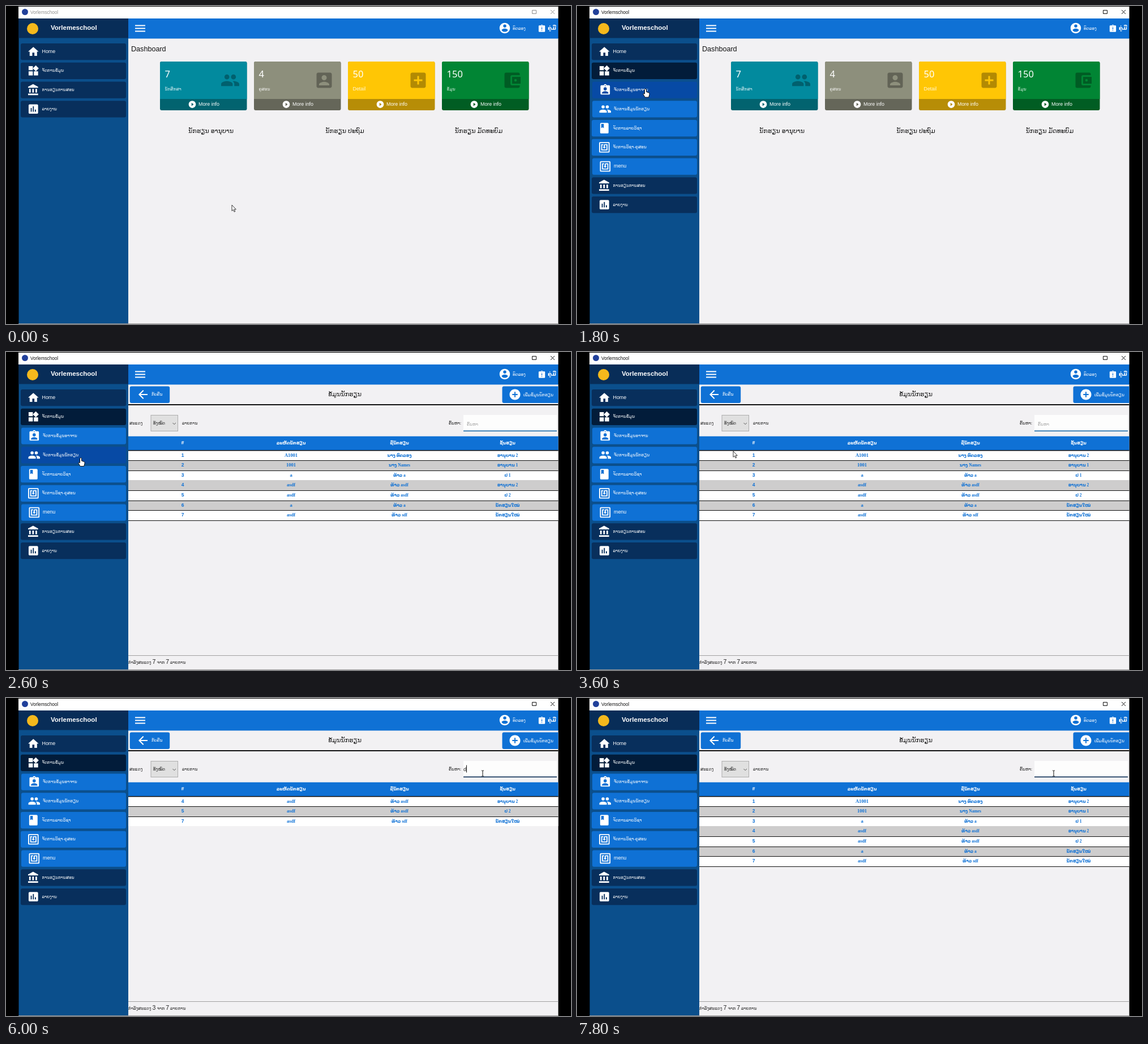
Animation of 998 by 561 pixels, one loop 8000 ms. Source, as an HTML page:

```html
<!DOCTYPE html>
<html lang="lo">
<head>
<meta charset="utf-8">
<title>School dashboard</title>
<style>
  html, body { margin: 0; width: 100%; height: 100%; overflow: hidden; background: #000; }
  svg { display: block; width: 998px; height: 561px; }
  text { font-family: "Liberation Sans", "Noto Sans", "DejaVu Sans", sans-serif; white-space: pre; }
  .wide { font-family: "Noto Sans", "DejaVu Sans", sans-serif; }
  .cell { font-family: "Liberation Serif", "Noto Sans", "DejaVu Sans", serif; }
</style>
</head>
<body>
<svg id="stage" viewBox="0 0 998 561"></svg>
<script>
const LOOP = 8000, TICK = 200;
const MENU_OPEN = 1400, PAGE_OPEN = 2600, FOCUS = 5400, TYPED = 5800, CLEARED = 6800;
const BLUE = '#0f71d5', NIGHT = '#082f5c', DEEP = '#021c3a', PAPER = '#f2f1f3';
const SMALL = 7.4, LATIN = 8.9;

const disc = 'M12 2C6.48 2 2 6.48 2 12s4.48 10 10 10 10-4.48 10-10S17.52 2 12 2z';
const box = 'M19 3H5c-1.1 0-2 .9-2 2v14c0 1.1.9 2 2 2h14c1.1 0 2-.9 2-2V5c0-1.1-.9-2-2-2z';
const clip = 'M19 3h-4.2a3 3 0 0 0-5.6 0H5a2 2 0 0 0-2 2v14a2 2 0 0 0 2 2h14a2 2 0 0 0 2-2V5a2 2 0 0 0-2-2zM12 3a1 1 0 1 1 0 2 1 1 0 0 1 0-2z';
const person = 'M12 7a3 3 0 1 1 0 6 3 3 0 0 1 0-6zM18 19H6v-1.4c0-2 4-3.1 6-3.1s6 1.1 6 3.1z';
const icons = {
  home: 'M10 20v-6h4v6h5v-8h3L12 3 2 12h3v8z',
  widgets: 'M13 13v8h8v-8zM3 21h8v-8H3zM3 3v8h8V3zM16.66 1.7 11 7.34 16.66 13l5.66-5.66z',
  bank: 'M4 10v7h3v-7zM10 10v7h3v-7zM2 22h19v-3H2zM16 10v7h3v-7zM11.5 1 2 6v2h19V6z',
  chart: box + 'M9 17H7v-7h2zM13 17h-2V7h2zM17 17h-2v-4h2z',
  badge: clip + person,
  late: clip + 'M11 8h2v6h-2zM11 16h2v2h-2z',
  group: 'M16 11a3 3 0 1 0 0-6 3 3 0 0 0 0 6zM8 11a3 3 0 1 0 0-6 3 3 0 0 0 0 6zM8 13c-2.33 0-7 1.17-7 3.5V19h14v-2.5C15 14.2 10.3 13 8 13zM16 13l-1 .05c1.2.84 2 1.97 2 3.45V19h6v-2.5c0-2.33-4.67-3.5-7-3.5z',
  book: 'M18 2H6a2 2 0 0 0-2 2v16a2 2 0 0 0 2 2h12a2 2 0 0 0 2-2V4a2 2 0 0 0-2-2zM6 4h5v8l-2.5-1.5L6 12z',
  tag: 'M20 2H4a2 2 0 0 0-2 2v16a2 2 0 0 0 2 2h16a2 2 0 0 0 2-2V4a2 2 0 0 0-2-2zM20 20H4V4h16zM18 6h-5a2 2 0 0 0-2 2v2.3a2 2 0 1 0 2 0V8h3v8H8V8h2V6H6v12h12z',
  user: disc + 'M12 5a3 3 0 1 1 0 6 3 3 0 0 1 0-6zM12 19.2c-2.5 0-4.7-1.3-6-3.2 0-2 4-3.1 6-3.1s6 1.1 6 3.1c-1.3 1.9-3.5 3.2-6 3.2z',
  profile: box + 'M12 6a3 3 0 1 1 0 6 3 3 0 0 1 0-6zM18 18H6v-1c0-2 4-3.1 6-3.1s6 1.1 6 3.1z',
  addBox: box + 'M17 13h-4v4h-2v-4H7v-2h4V7h2v4h4z',
  wallet: 'M21 18v1a2 2 0 0 1-2 2H5a2 2 0 0 1-2-2V5a2 2 0 0 1 2-2h14a2 2 0 0 1 2 2v1h-9a2 2 0 0 0-2 2v8a2 2 0 0 0 2 2zM12 16h10V8H12zM16 13.5a1.5 1.5 0 1 1 0-3 1.5 1.5 0 0 1 0 3z',
  play: disc + 'M10 16.5v-9l6 4.5z',
  back: 'M20 11H7.83l5.59-5.59L12 4l-8 8 8 8 1.41-1.41L7.83 13H20z',
  add: disc + 'M17 13h-4v4h-2v-4H7v-2h4V7h2v4h4z'
};

// icon, label, indent; submenu entries carry their own fill
const mainItems = [
  ['home', 'Home', 0], ['widgets', 'ຈັດການຂໍ້ມູນ', 0], ['bank', 'ການຮຽນການສອນ', 0], ['chart', 'ລາຍງານ', 0]
];
const subItems = [
  ['badge', 'ຈັດການຂໍ້ມູນອາຈານ', 1.5], ['group', 'ຈັດການຂໍ້ມູນນັກຮຽນ', 1.5], ['book', 'ຈັດການລາຍວິຊາ', 0],
  ['tag', 'ຈັດການວິຊາ-ຄູສອນ', 0], ['tag', 'menu', 1.5]
].map(item => [...item, BLUE]);
const cards = [
  ['7', 'ນັກສຶກສາ', '#028a9e', '#02636f', 'group', 1.45],
  ['4', 'ຄູສອນ', '#8d8f7c', '#656659', 'profile', 1.5],
  ['50', 'Detail', '#ffc605', '#b78d06', 'addBox', 1.5],
  ['150', 'ຂໍ້ມູນ', '#018534', '#015d23', 'wallet', 1.5]
];
const students = [
  ['1', 'A1001', 'ນາງ ທົດລອງ', 'ອານຸບານ 2'],
  ['2', '1001', 'ນາງ Names', 'ອານຸບານ 1'],
  ['3', 'a', 'ທ້າວ a', 'ປ 1'],
  ['4', 'asdf', 'ທ້າວ asdf', 'ອານຸບານ 2'],
  ['5', 'asdf', 'ທ້າວ asdf', 'ປ 2'],
  ['6', 'a', 'ທ້າວ a', 'ນັກຮຽນໃໝ່'],
  ['7', 'asdf', 'ທ້າວ sdf', 'ນັກຮຽນໃໝ່']
];
const columns = [312, 503.5, 695, 886];

// time, x, y of the pointer tip
const route = [
  [0, 399, 351], [200, 399, 351], [1000, 118, 110.5], [1400, 118, 110.5], [1800, 121, 146],
  [2400, 132, 186.5], [3200, 132, 186.5], [4600, 858, 128], [5000, 858, 128], [5400, 842, 133], [LOOP, 842, 133]
];

const rect = (x, y, w, h, fill, extra = '') =>
  `<rect x="${x}" y="${y}" width="${w}" height="${h}" fill="${fill}" ${extra}/>`;
const text = (x, y, size, value, fill = '#fff', extra = '') =>
  `<text x="${x}" y="${y}" font-size="${size}" fill="${fill}" ${extra}>${value}</text>`;
const path = (d, stroke, width = 1, fill = 'none') =>
  `<path d="${d}" stroke="${stroke}" stroke-width="${width}" fill="${fill}"/>`;
const icon = (name, cx, cy, scale, extra = 'fill="#fff"') =>
  `<path transform="translate(${cx - 12 * scale} ${cy - 12 * scale}) scale(${scale})" fill-rule="evenodd" d="${icons[name]}" ${extra}/>`;
const labelSize = label => /[a-z]/.test(label) ? LATIN : SMALL;
const MID = 'text-anchor="middle"', BOLD = 'font-weight="700"';

function pointerAt(t) {
  const i = route.findIndex((p, k) => k && t <= p[0]);
  const [t0, x0, y0] = route[i - 1], [t1, x1, y1] = route[i];
  const u = (t - t0) / (t1 - t0), e = u * u * (3 - 2 * u);
  return { x: x0 + (x1 - x0) * e, y: y0 + (y1 - y0) * e };
}

function frameOfWindow(active) {
  const ink = active ? '#111' : '#8f8f8f';
  return rect(22, 1, 953.5, 21, '#fff') +
    '<circle cx="33.5" cy="10.5" r="5.5" fill="#21409a"/>' +
    text(43, 13.7, 8.2, 'Vorlemschool', ink) +
    path('M929.5 7.5h7v6h-7z', ink) + path('M962 7l7 7M969 7l-7 7', ink) +
    rect(22.5, 22, 193.5, 539, '#0b4f8c') + rect(22.5, 22, 193.5, 34.5, '#082d58') +
    '<circle cx="47" cy="40" r="10" fill="#f5b91c"/>' +
    text(79, 42.3, 11.5, 'Vorlemeschool', '#fff', BOLD) +
    rect(216, 57, 759.5, 504, PAPER) + rect(216, 22, 759.5, 35.5, BLUE) +
    [33.5, 38.5, 43.5].map(y => rect(228, y, 18, 2, '#fff')).join('') +
    icon('user', 881, 39, .92) + text(895, 41.5, SMALL, 'ທົດລອງ') +
    icon('late', 946.5, 40, .63) + text(957, 42.2, 9.4, 'ຄູ່ມື', '#fff', BOLD) +
    rect(22, 560, 953.5, 1, '#9a9a9a');
}

function sidebar(open, pointer) {
  const items = open ? [...mainItems.slice(0, 2), ...subItems, ...mainItems.slice(2)] : mainItems;
  let hovered = false;
  const svg = items.map(([name, label, indent, subFill], i) => {
    const y = 66 + 33.75 * i;
    const over = pointer.x > 26 && pointer.x < 212 && pointer.y > y && pointer.y < y + 30;
    hovered = hovered || over;
    const dark = over || (open && i === 1);
    const fill = subFill ? (over ? '#074aa5' : subFill) : (dark ? DEEP : NIGHT);
    const x = indent ? 27 : 26;
    return rect(x, y, 212 - x, 29.3, fill, 'rx="3"') +
      icon(name, 48.3 + indent, y + 14.5, .93) +
      text(63.5 + indent, y + 16.6, labelSize(label), label);
  }).join('');
  return { svg, hovered };
}

function dashboard() {
  const heads = [[362, 'ນັກຮຽນ ອານຸບານ'], [598.5, 'ນັກຮຽນ ປະຖົມ'], [835, 'ນັກຮຽນ ມັດທະຍົມ']];
  return text(221, 80.3, 12.6, 'Dashboard', '#111') +
    cards.map(([count, label, fill, foot, name, scale], i) => {
      const x = 272 + 166 * i;
      return rect(x, 98, 153.5, 86, foot, 'rx="3"') +
        path(`M${x} 164v-63q0-3 3-3h147.5q3 0 3 3v63z`, 'none', 0, fill) +
        text(x + 8.5, 125.5, 16.5, count, '#fff', 'class="wide"') +
        text(x + 8.5, 149, labelSize(label), label, '#fff', 'opacity=".85"') +
        icon(name, x + 124, 131, scale, 'fill="#000" opacity=".3"') +
        icon('play', x + 57, 173.6, .63) + text(x + 68, 176.4, LATIN, 'More info');
    }).join('') +
    heads.map(([x, label]) => text(x, 224, 11, label, '#111', MID)).join('');
}

function studentPage(t) {
  const filtered = t >= TYPED && t < CLEARED, focused = t >= FOCUS;
  const rows = filtered ? students.filter(r => r[1].includes('d')) : students;
  const caret = focused && Math.floor((t - TYPED + 1060) / 530) % 2 === 0;
  const caretX = filtered ? 813.5 : 809.5;
  const heads = ['#', 'ລະຫັດນັກຮຽນ', 'ຊື່ນັກຮຽນ', 'ຊັ້ນຮຽນ'];
  const rowTop = i => Math.floor(174 + 17.6 * i);
  const note = (x, value) => text(x, 128, SMALL, value, '#222');

  let svg = rect(218.7, 60.5, 70.5, 29.5, BLUE, 'rx="3"') + icon('back', 242, 75, 1) + text(257, 77.3, SMALL, 'ກັບຄືນ') +
    text(598.5, 78, 11, 'ຂໍ້ມູນນັກຮຽນ', '#111', MID) +
    path('M975.5 60.5H879.5q-3 0-3 3v23.5q0 3 3 3h96z', 'none', 0, BLUE) +
    icon('add', 899, 75, .95) + text(914, 77.5, SMALL, 'ເພີ່ມຂໍ້ມູນນັກຮຽນ') +
    rect(216, 92, 759.5, 2, '#111') +
    note(218, 'ສະແດງ') +
    rect(256, 111.5, 47.5, 28, '#e0e0e0', 'stroke="#adadad"') +
    note(260, 'ທັງໝົດ') + path('M294.5 125l2.7 2.7 2.7-2.7', '#555') +
    note(311, 'ລາຍການ') + note(782, 'ຄົ້ນຫາ:') +
    rect(808, 111, 165, 28, '#fdfdfd') + rect(808, 138.5, 165, 1.6, focused ? '#0a2d55' : '#1768a8');
  if (!focused) svg += text(814, 130, SMALL, 'ຄົ້ນຫາ', '#a5a5a5');
  if (filtered) svg += text(808, 128.5, 9, 'd', '#222');
  if (caret) svg += path(`M${caretX} 118.5v13`, '#111');

  svg += rect(216, 148.7, 759.5, 25, BLUE) +
    columns.map((x, i) => text(x, 163, i ? 7.5 : 8.8, heads[i], '#fff', `${MID} ${BOLD}`)).join('');
  rows.forEach((row, i) => {
    const y = rowTop(i);
    svg += rect(216, y, 759.5, rowTop(i + 1) - y, i % 2 ? '#cecdcd' : '#fff') +
      row.map((value, c) =>
        text(columns[c], y + 11, c < 2 ? 8.5 : 7.5, value, BLUE, `${MID} ${BOLD} class="${c ? 'cell' : ''}"`)).join('');
  });
  svg += rect(216, 173, 759.5, 1.5, '#111');
  rows.forEach((_, i) => {
    if (i !== 2) svg += rect(216, rowTop(i + 1), 759.5, 1, '#111');
  });
  const number = n => `<tspan font-size="10.5">${n}</tspan>`;
  return svg + rect(216, 535, 759.5, 1, '#a0a0a0') +
    text(216, 550, SMALL, `ກຳລັງສະແດງ ${number(rows.length)} ຈາກ ${number(7)} ລາຍການ`, '#222');
}

function cursor({ x, y }, hovered, onPage) {
  const inField = onPage && x > 808 && x < 973 && y > 111 && y < 140;
  const shape = inField
    ? path('M-2-5h1.5l.5.5.5-.5H2M0-4.5v9M-2 5h1.5l.5-.5.5.5H2', '#111')
    : hovered
      ? path('M-1.5 1Q0-1 1.5 1V5.5L6 7Q7.4 7.7 7 10L5.7 15H-.8L-4 9.8Q-4.6 7.4-1.5 9Z', '#111', 1, '#fff')
      : path('M0 0v10.5l2.4-2.2 1.7 3.9 1.7-.8-1.7-3.6h3.2z', '#222', .9, '#fff');
  return `<g transform="translate(${x} ${y})">${shape}</g>`;
}

function render(t) {
  const pointer = pointerAt(t), onPage = t >= PAGE_OPEN;
  const menu = sidebar(t >= MENU_OPEN, pointer);
  return frameOfWindow(t >= MENU_OPEN) + menu.svg +
    (onPage ? studentPage(t) : dashboard()) + cursor(pointer, menu.hovered, onPage);
}

const stage = document.getElementById('stage');
let shown = -1;
function play() {
  const t = Math.floor(performance.now() % LOOP / TICK) * TICK;
  if (t !== shown) stage.innerHTML = render(shown = t);
  requestAnimationFrame(play);
}
play();
</script>
</body>
</html>
```
